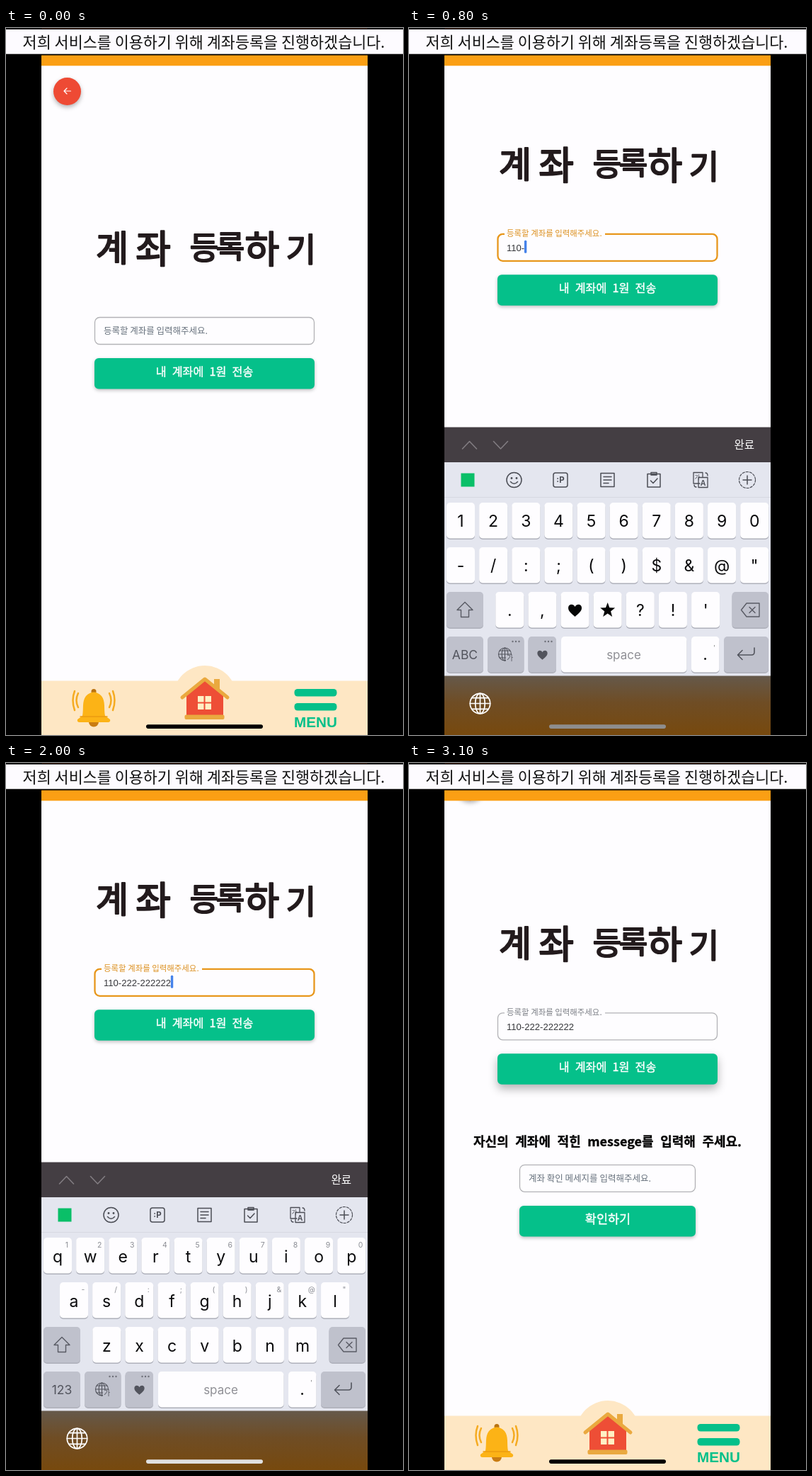
Write an HTML page with a canvas that moves like this. It is 561x998 px and loops after 3.2 s.

```html
<!DOCTYPE html>
<html lang="ko">
<head>
<meta charset="utf-8">
<title>계좌 등록하기</title>
<style>
html, body { margin: 0; width: 100%; height: 100%; overflow: hidden; background: #000; }
canvas { display: block; }
</style>
</head>
<body>
<canvas id="stage" width="561" height="998"></canvas>
<script>
const ctx = document.getElementById('stage').getContext('2d');
const LOOP = 3200, STEP = 100;
const KR = '"Noto Sans CJK KR", "Noto Sans CJK", sans-serif';
const UI = 'Inter, Roboto, sans-serif';
const ARIAL = '"Liberation Sans", Arial, sans-serif';
const GREEN = '#05c08a', PAPER = '#fefdff', ICON = '#4b4d55';
const ACCOUNT = '110-222-222222';

// Linear interpolation through [time, value] stops
function along(t, stops) {
  let [t0, v0] = stops[0];
  for (const [t1, v1] of stops) {
    if (t <= t1) return t1 === t0 ? v1 : v0 + (v1 - v0) * (t - t0) / (t1 - t0);
    [t0, v0] = [t1, v1];
  }
  return v0;
}

function rect(x, y, w, h, fill) {
  ctx.fillStyle = fill;
  ctx.fillRect(x, y, w, h);
}

function round(x, y, w, h, r, fill) {
  ctx.beginPath();
  ctx.roundRect(x, y, w, h, r);
  ctx.fillStyle = fill;
  ctx.fill();
}

function path(d, stroke, width = 1.5, fill) {
  const p = new Path2D(d);
  if (fill) { ctx.fillStyle = fill; ctx.fill(p); }
  if (stroke) {
    ctx.strokeStyle = stroke;
    ctx.lineWidth = width;
    ctx.stroke(p);
  }
}

function disc(x, y, r, fill) {
  ctx.beginPath();
  ctx.arc(x, y, r, 0, 7);
  ctx.fillStyle = fill;
  ctx.fill();
}

function ring(x, y, rx, ry, stroke, width) {
  ctx.beginPath();
  ctx.ellipse(x, y, rx, ry, 0, 0, Math.PI * 2);
  ctx.strokeStyle = stroke;
  ctx.lineWidth = width;
  ctx.stroke();
}

// Text centred vertically on y
function text(str, x, y, size, { family = KR, weight = 400, color = '#000', align = 'left', gap = 0, ink = 0 } = {}) {
  ctx.font = `${weight} ${size}px ${family}`;
  ctx.textAlign = align;
  ctx.wordSpacing = gap + 'px';
  ctx.fillStyle = ctx.strokeStyle = color;
  const base = y + size * (family === KR ? 0.38 : 0.36);
  ctx.fillText(str, x, base);
  if (ink) {
    ctx.lineWidth = ink;
    ctx.strokeText(str, x, base);
  }
  ctx.wordSpacing = '0px';
}

function withShadow(color, blur, dy, draw) {
  ctx.save();
  ctx.shadowColor = color;
  ctx.shadowBlur = blur;
  ctx.shadowOffsetY = dy;
  draw();
  ctx.restore();
}

function drawTitle() {
  const glyphs = [['계', 150, 310, 50], ['좌', 208, 311, 54], ['등', 280, 309, 44],
    ['록', 317, 308, 44], ['하', 362, 312, 53], ['기', 417, 312, 46]];
  for (const [ch, x, y, size] of glyphs)
    text(ch, x, y, size, { weight: 500, color: '#231b1d', align: 'center', ink: 2.2 });
}

function drawField(x, y, w, label, focus, floating) {
  const h = 38;
  ctx.save();
  if (floating) {
    const hole = new Path2D();
    hole.rect(0, y - 400, 561, 800);
    hole.rect(x + 10, y - 4, 142, 8);
    ctx.clip(hole, 'evenodd');
  }
  ctx.beginPath();
  ctx.roundRect(x + .5, y, w - 1, h, 7);
  ctx.strokeStyle = focus ? '#e8971c' : '#b2b2b6';
  ctx.lineWidth = focus ? 2.3 : 1.3;
  ctx.stroke();
  ctx.restore();
  if (floating) text(label, x + 13, y - 1, 11.45, { color: focus ? '#dc9020' : '#7c7f86' });
  else text(label, x + 13, y + 18.5, 12.5, { color: '#66707c' });
}

function drawButton(x, y, w, raised) {
  withShadow(raised ? 'rgba(0,0,0,.3)' : 'rgba(0,0,0,.25)', raised ? 13 : 5, raised ? 6 : 2,
    () => round(x, y, w, 43.5, 6, GREEN));
}

function drawPage(t) {
  const focus = t >= 100 && t < 2100;
  ctx.save();
  ctx.translate(0, along(t, [[0, 0], [200, -117.7], [2100, -117.7], [2200, -84.7], [2300, -55.7]]));

  withShadow('rgba(0,0,0,.3)', 6, 3, () => disc(86.5, 89.5, 19.5, '#ee4a34'));
  path('M91.5 89H82M86 85L82 89L86 93', '#fff', 1.2);
  drawTitle();

  drawField(125, 408.5, 311, '등록할 계좌를 입력해주세요.', focus, t >= 100);
  const typed = ACCOUNT.slice(0, Math.max(0, Math.floor(t / STEP) - 4));
  text(typed, 138, 427.5, 13.1, { family: ARIAL, color: '#35363a' });
  if (focus) round(138 + ctx.measureText(typed).width - .3, 417.5, 3.4, 18, 1.5, '#4582ea');

  drawButton(125, 466, 311, t >= 2100);
  if (t >= 2100 && t < 2400) {
    ctx.save();
    ctx.beginPath();
    ctx.roundRect(125, 466, 311, 43.5, 6);
    ctx.clip();
    disc(385, 488, along(t, [[2100, 70], [2200, 140], [2300, 290]]),
      `rgba(255,255,255,${t < 2300 ? .15 : .07})`);
    ctx.restore();
  }
  text('내 계좌에 1원 전송', 280.5, 485, 16.2, { weight: 500, color: '#fff', align: 'center', gap: 4.5, ink: .4 });

  if (t >= 2300) {
    text('자신의 계좌에 적힌 messege를 입력해 주세요.', 280.5, 589.5, 18, { weight: 700, align: 'center', gap: 5.5, ink: .3 });
    drawField(156, 623, 249, '계좌 확인 메세지를 입력해주세요.', false, false);
    drawButton(156, 680.7, 249, false);
    text('확인하기', 281, 699.5, 17.5, { weight: 500, color: '#fff', align: 'center', ink: .4 });
  }
  ctx.restore();
}

function drawNav() {
  const cream = '#fee7c4', gold = '#fcb316', tan = '#eaa93f', red = '#ee4e36';
  rect(50, 921.5, 461, 77, cream);
  disc(281, 944.7, 44.7, cream);

  disc(124, 936.5, 3.5, '#b97311');
  disc(124, 979.5, 7, '#c97c12');
  path('M108 971C110 961 107 951 113 943Q124 932 135 943C141 951 138 961 140 971L147 976Q148 980 144 980H104Q100 980 101 976Z', null, 0, gold);
  path('M105 972H143', '#eb9c10', 1.5);
  path('M102 939Q97 949 102 959M97 936Q92 949 97 963M146 939Q151 949 146 959M151 936Q156 949 151 963', '#f5ab21', 2.5);

  rect(294, 919, 8, 16, tan);
  path('M255 971V941L281 919L307 941V971Z', null, 0, red);
  path('M249 945L281 919L313 945', tan, 5);
  round(252.5, 969.5, 56, 6.5, 2, tan);
  rect(271, 943, 19, 19, '#fff0c4');
  path('M280.5 943V962M271 952.5H290', red, 2);

  round(407.5, 933, 60, 10.5, 4.5, GREEN);
  round(407.5, 953, 60, 10.5, 4.5, GREEN);
  text('MENU', 437.5, 979.5, 20.7, { family: ARIAL, weight: 700, color: GREEN, align: 'center' });
}

function key(x, y, w, dark) {
  round(x, y + 1.5, w, 50.5, 5, '#aeb0ba');
  round(x, y, w, 50.5, 5, dark ? '#bfc1cc' : PAPER);
}

function heart(x, y, s, fill) {
  ctx.save();
  ctx.translate(x, y);
  ctx.scale(s, s);
  path('M0 9C-4 5 -9.5 2 -9.5 -3.5C-9.5 -9 -2.5 -10 0 -5C2.5 -10 9.5 -9 9.5 -3.5C9.5 2 4 5 0 9Z', null, 0, fill);
  ctx.restore();
}

function star(x, y, r) {
  ctx.beginPath();
  for (let i = 0; i < 10; i++) {
    const a = i * Math.PI / 5 - Math.PI / 2, d = i % 2 ? r * .42 : r;
    ctx.lineTo(x + d * Math.cos(a), y + d * Math.sin(a));
  }
  ctx.fillStyle = '#050505';
  ctx.fill();
}

function globe(x, y, r, color, width) {
  ring(x, y, r, r, color, width);
  ring(x, y, r * .48, r, color, width);
  const c = r * .82, k = r * .55;
  path(`M${x - r} ${y}H${x + r}M${x} ${y - r}V${y + r}M${x - c} ${y - k}H${x + c}M${x - c} ${y + k}H${x + c}`, color, width);
}

function keyRow(chars, x, y, letters, hints = '') {
  [...chars].forEach((ch, i) => {
    const left = x + i * 46.13, mid = left + 20;
    key(left, y, 40);
    if (ch === '♥') heart(mid, y + 26, 1, '#050505');
    else if (ch === '★') star(mid, y + 26, 11);
    else text(ch, mid, y + (letters ? 27 : 26), 23, { family: UI, color: '#0b0b0d', align: 'center' });
    if (hints[i]) text(hints[i], left + 33, y + 10, 10.5, { family: UI, color: '#8b8d94', align: 'center' });
  });
}

function drawToolbar() {
  const y = 638;
  rect(73.5, 628.5, 19, 19, '#0abf68');
  ring(148.5, y, 10.5, 10.5, ICON, 1.5);
  disc(145, 635.5, 1.4, ICON);
  disc(152, 635.5, 1.4, ICON);
  path('M143.5 640.5Q148.5 646 153.5 640.5', ICON);
  path('M207 628H221Q224 628 224 631V645Q224 648 221 648H207Q204 648 204 645V631Q204 628 207 628Z', ICON);
  text(':P', 214, 638, 11.5, { family: UI, weight: 700, color: ICON, align: 'center' });
  path('M271 628.5H290V647.5H271ZM275 633.5H286M275 638H286M275 642.5H282', ICON);
  path('M337 629.5H355V648H337ZM342 627.5H350V631H342ZM341.5 639L345 642.5L351 636', ICON);
  path('M411 643H402V627.5H415V634M409 634.5H422V648.5H409ZM419 628Q422 628 422 632M403 645Q403 648 406 648', ICON, 1.3);
  text('가', 407.5, 633.5, 8.5, { color: ICON, align: 'center' });
  text('A', 415.5, 641.8, 10.5, { family: UI, weight: 600, color: ICON, align: 'center' });
  ctx.setLineDash([3.2, 2]);
  ring(478, y, 11.5, 11.5, ICON, 1.2);
  ctx.setLineDash([]);
  path('M472 638H484M478 632V644', ICON);
}

function drawKeyboard(letters) {
  rect(50, 563.5, 461, 50, '#443e43');
  path('M75.5 594L85.5 583.5L95.5 594M119.5 583.5L129.5 594L139.5 583.5', '#817c81', 1.6);
  text('완료', 459.5, 588.5, 15.6, { weight: 500, color: '#fff' });
  rect(50, 613, 461, 302, '#e4e6ef');
  rect(50, 662, 461, 1, '#d6d8e1');
  drawToolbar();

  if (letters) {
    keyRow('qwertyuiop', 53, 670, true, '1234567890');
    keyRow('asdfghjkl', 76, 733, true, '-/:;()&@"');
    keyRow('zxcvbnm', 122.3, 796, true);
  } else {
    keyRow('1234567890', 53, 670);
    keyRow('-/:;()$&@"', 53, 733);
    keyRow(".,♥★?!'", 122.3, 796);
  }

  key(53, 796, 52, true);
  path('M79 810.5L90 821.5H84.5V831.5H73.5V821.5H68Z', '#595b64', 1.4);
  key(456.5, 796, 51.5, true);
  path('M469.5 821.5L477 812H495V831H477ZM481 817.5L489 825.5M489 817.5L481 825.5', '#595b64', 1.4);

  key(53, 859, 52, true);
  text(letters ? '123' : 'ABC', 79, 884.5, 17.5, { family: UI, color: '#52545d', align: 'center' });
  key(111, 859, 51.5, true);
  globe(135.5, 884, 9, '#52545d', 1.1);
  rect(137, 885, 11, 10, '#bfc1cc');
  text('가', 142.5, 889.5, 10, { weight: 500, color: '#52545d', align: 'center' });
  key(168.5, 859, 39.5, true);
  heart(188.5, 885, .75, '#52545d');
  for (const x of [151, 197])
    for (const d of [-4.5, 0, 4.5]) disc(x + d, 866, 1.2, '#6d6f78');
  key(215, 859, 177.5);
  text('space', 303.5, 884.5, 17, { family: UI, color: '#909096', align: 'center' });
  key(399, 859, 39.5);
  text('.', 418.5, 884, 23, { family: UI, color: '#0b0b0d', align: 'center' });
  text("'", 431.5, 875, 9, { family: UI, color: '#777', align: 'center' });
  key(445, 859, 63, true);
  path('M488 875V881Q488 885 484 885H465M471 878.5L464.5 885L471 891.5', '#52545d', 1.6);

  const shade = ctx.createLinearGradient(0, 914, 0, 998);
  shade.addColorStop(0, '#65594b');
  shade.addColorStop(.45, '#6f4d25');
  shade.addColorStop(1, '#77490e');
  rect(50, 914.5, 461, 84, shade);
  globe(100.5, 953.5, 14.2, '#fff', 1.7);
}

function drawFrame(t) {
  ctx.lineJoin = ctx.lineCap = 'round';
  rect(0, 0, 561, 998, '#000');
  ctx.save();
  ctx.beginPath();
  ctx.rect(50, 0, 461, 998);
  ctx.clip();
  rect(50, 38, 461, 960, PAPER);
  drawPage(t);
  drawNav();

  const drop = along(t, [[0, 435], [200, 0], [2100, 0], [2200, 232.7], [2400, 435]]);
  if (drop < 435) {
    ctx.save();
    ctx.translate(0, drop);
    drawKeyboard(t < 300 || t >= 1900);
    ctx.restore();
  }

  const tone = Math.round(along(t, [[0, 0], [300, 62], [800, 142], [1300, 252], [1900, 252], [2200, 168], [2500, 150], [3000, 8], [3100, 0]]));
  round(198, 983.3, 165, 5.6, 2.8, `rgb(${tone},${tone},${tone})`);
  rect(50, 0, 461, 53.3, '#fb9f14');
  ctx.restore();

  // Caption strip across the whole stage
  rect(0, 0, 561, 38.5, '#000');
  rect(50, 0, 461, 1, '#4a2d05');
  rect(0, 2, 561, 34.7, '#fdfbff');
  text('저희 서비스를 이용하기 위해 계좌등록을 진행하겠습니다.', 279.5, 19.5, 21.8, { color: '#111', align: 'center' });
}

function tick(now) {
  drawFrame(Math.floor(now % LOOP / STEP) * STEP);
  requestAnimationFrame(tick);
}
requestAnimationFrame(tick);
</script>
</body>
</html>
```
